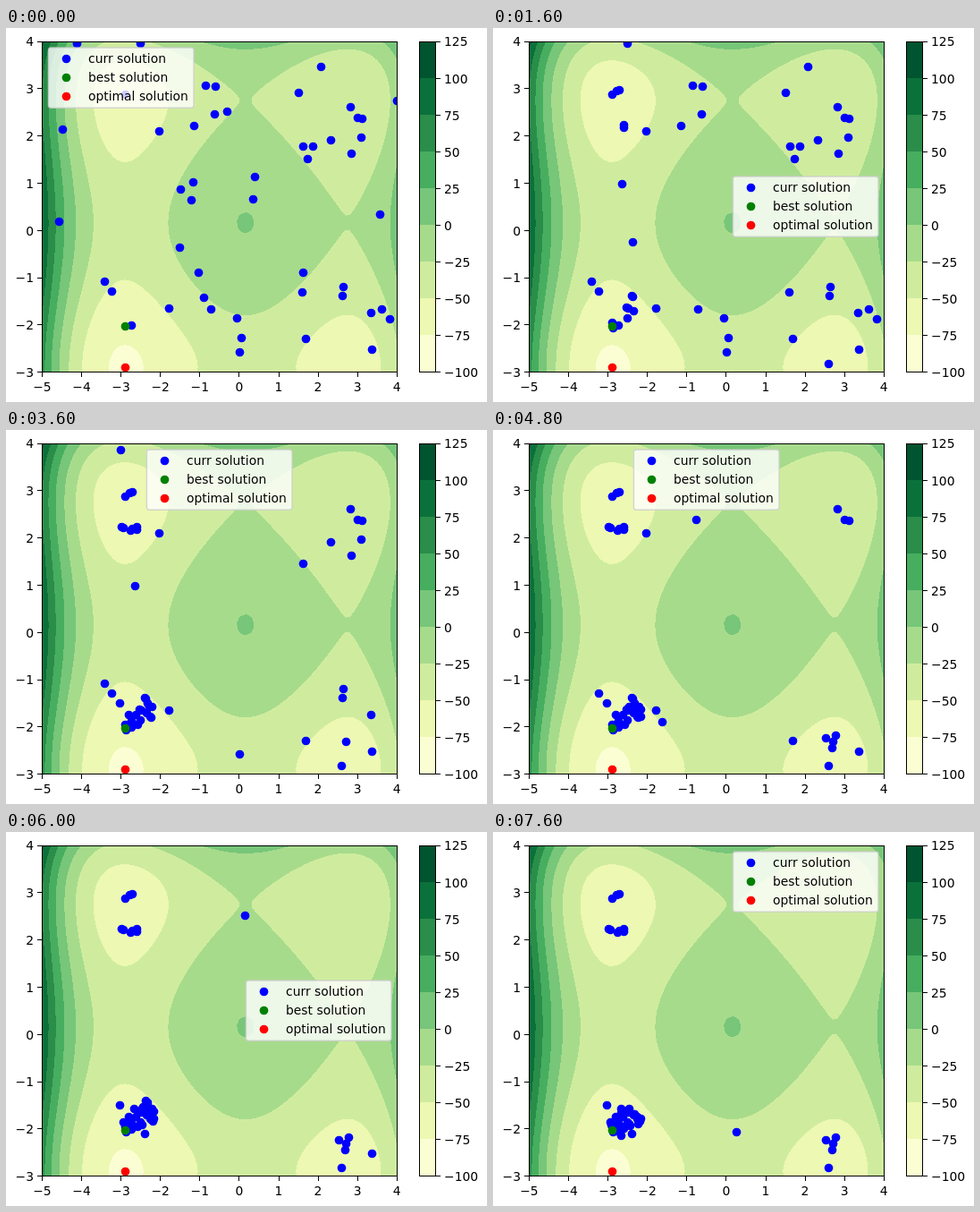
These frames come from a looping animation (538x418 px, 8 s). An HTML page with a canvas:

```html
<!DOCTYPE html>
<html lang="en">
<head>
<meta charset="utf-8">
<title>Population search</title>
<style>
html, body { margin: 0; width: 100%; height: 100%; overflow: hidden; background: #fff; }
canvas, svg { position: absolute; left: 0; top: 0; }
text { font: 13.89px "DejaVu Sans", sans-serif; }
</style>
</head>
<body>
<canvas id="field" width="538" height="418"></canvas>
<svg width="538" height="418">
  <clipPath id="plot"><rect x="40" y="15" width="397.5" height="369.5"/></clipPath>
  <g clip-path="url(#plot)">
    <g id="dots" fill="blue"></g>
    <circle cx="133.5" cy="333.5" r="4.86" fill="green"/>
    <circle cx="133.5" cy="379.5" r="4.86" fill="red"/>
  </g>
  <g id="axes" shape-rendering="crispEdges"></g>
  <g id="labels"></g>
  <g id="legend"></g>
</svg>
<script>
const $ = id => document.getElementById(id);
const STEP = 400, STEPS = 20;
const LEFT = 40.4, BOTTOM = 384.4, UX = 396.8 / 9, UY = 369.6 / 7, BAND = 369.6 / 9;
const toX = v => LEFT + (v + 5) * UX, toY = v => BOTTOM - (v + 3) * UY;
const dataX = x => (x + 0.5 - LEFT) / UX - 5, dataY = y => (BOTTOM - y - 0.5) / UY - 3;

// Colour ramp, one colour per band of 25 from -100 to 125
const ramp = ["ffffe5", "f7fcb9", "d9f0a3", "addd8e", "78c679", "41ab5d", "238443", "006837", "004529"]
  .map(h => [0, 2, 4].map(i => parseInt(h.substr(i, 2), 16)));
const bands = ramp.map((_, i) => {
  const p = Math.floor((i + 0.5) / 9 * 256) / 255 * 8, k = Math.floor(p);
  return ramp[k].map((c, j) => Math.round(c + (ramp[Math.min(k + 1, 8)][j] - c) * (p - k)));
});

// Each axis adds (v^4 - 16v^2 + 5v) / 2, sampled every 0.1 and joined linearly
const term = v => (v ** 4 - 16 * v * v + 5 * v) / 2;
function sampled(v) {
  const k = Math.floor(v * 10), a = term(k / 10);
  return a + (term((k + 1) / 10) - a) * (v * 10 - k);
}
const cost = ([x, y]) => term(dataX(x)) + term(dataY(y));

const ctx = $("field").getContext("2d");
const image = ctx.createImageData(398, 370);
for (let j = 0; j < 370; j++) {
  const fy = sampled(dataY(j + 15));
  for (let i = 0; i < 398; i++) {
    const band = Math.floor((sampled(dataX(i + 40)) + fy + 100) / 25);
    image.data.set([...bands[Math.max(0, Math.min(8, band))], 255], (j * 398 + i) * 4);
  }
}
ctx.putImageData(image, 40, 15);
bands.forEach((c, i) => {
  const top = Math.round(BOTTOM - (i + 1) * BAND), end = Math.round(BOTTOM - i * BAND);
  ctx.fillStyle = `rgb(${c})`;
  ctx.fillRect(462, top, 19, end - top);
});

// Frames, ticks and labels
const bar = (x, y, w, h) => `<rect x="${Math.round(x)}" y="${Math.round(y)}" width="${w}" height="${h}"/>`;
const frame = (x, w) => bar(x, 15, w, 1) + bar(x, 384, w, 1) + bar(x, 15, 1, 370) + bar(x + w - 1, 15, 1, 370);
const label = (x, y, s, anchor) =>
  `<text x="${x}" y="${Math.round(y)}" text-anchor="${anchor}">${String(s).replace("-", "\u2212")}</text>`;
let axes = frame(40, 398) + frame(462, 19), labels = "";
for (let v = -5; v <= 4; v++) {
  axes += bar(toX(v) - 0.4, 385, 1, 5);
  labels += label(toX(v), 406, v, "middle");
}
for (let v = -3; v <= 4; v++) {
  axes += bar(35, toY(v) - 0.2, 5, 1);
  labels += label(31, toY(v) + 5.7, v, "end");
}
for (let i = 0; i <= 9; i++) {
  const y = BOTTOM - i * BAND;
  axes += bar(481, y - 0.2, 5, 1);
  labels += label(490, y + 5.7, i * 25 - 100, "start");
}
$("axes").innerHTML = axes;
$("labels").innerHTML = labels;

const circle = (x, y, fill = "") =>
  `<circle cx="${x + 0.5}" cy="${y + 0.5}" r="4.86" ${fill && `fill="${fill}"`}/>`;
$("legend").innerHTML =
  `<rect x=".4" width="162.6" height="67.3" rx="2.8" fill="#fff" fill-opacity=".8" stroke="#ccc" stroke-opacity=".8" stroke-width="1.39"/>` +
  [["blue", "curr"], ["green", "best"], ["red", "optimal"]].map(([color, word], i) =>
    circle(20, 12 + i * 21, color) + label(45, 17 + i * 21, word + " solution", "start")).join("");

// Step from which the legend stands at x, y
const places = [[0, 47, 22], [2, 268, 166], [9, 157, 22], [13, 268, 166], [16, 268, 22]];

let seed = 20231;
const random = () => (seed = seed * 16807 % 2147483647) / 2147483647;

// Where good candidates gather, up to a given step
const nests = [
  { until: 3, x: 136, y: 69, r: 8 },
  { until: 9, x: 137, y: 110, r: 10 },
  { until: 13, x: 380, y: 344, r: 16 },
  { until: STEPS, x: 152, y: 319, r: 26 }
];
const near = ({ x, y, r }) => [x, y].map(c => Math.round(c + r * (random() + random() - 1)));
const anywhere = () => [Math.round(41 + 396 * random()), Math.round(16 + 368 * random())];

// Starting population, x and y in turn
const begin = [
  79,17, 150,17, 133,74, 63,113, 171,115, 223,64, 234,65, 247,93, 233,96, 210,109, 352,43, 327,72, 437,81,
  385,88, 393,100, 398,101, 397,122, 363,125, 332,132, 343,132, 337,146, 386,140, 278,166, 276,191, 418,208,
  195,180, 209,172, 207,192, 59,216, 194,245, 215,273, 332,273, 331,295, 377,289, 376,299, 110,283, 118,294,
  182,313, 221,301, 229,314, 258,324, 263,346, 261,362, 335,347, 408,318, 420,314, 429,325, 409,359, 140,332
];
let dots = [];
for (let i = 0; i < begin.length; i += 2) dots.push([begin[i], begin[i + 1]]);

// At each step the four worst make room for two in the main nest, one in the current nest and one stray
const history = [dots];
for (let step = 1; step < STEPS; step++) {
  const main = nests[nests.length - 1], current = nests.find(n => step < n.until);
  dots = [...dots].sort((a, b) => cost(b) - cost(a)).slice(4);
  dots.push(near(main), near(main), near(current), anywhere());
  history.push(dots);
}

let shown = -1;
function show(step) {
  if (step === shown) return;
  shown = step;
  $("dots").innerHTML = history[step].map(([x, y]) => circle(x, y)).join("");
  const [, x, y] = places.filter(p => p[0] <= step).pop();
  $("legend").setAttribute("transform", `translate(${x} ${y})`);
}

const start = performance.now();
function tick() {
  show(Math.floor((performance.now() - start) / STEP) % STEPS);
  requestAnimationFrame(tick);
}
tick();
</script>
</body>
</html>
```
